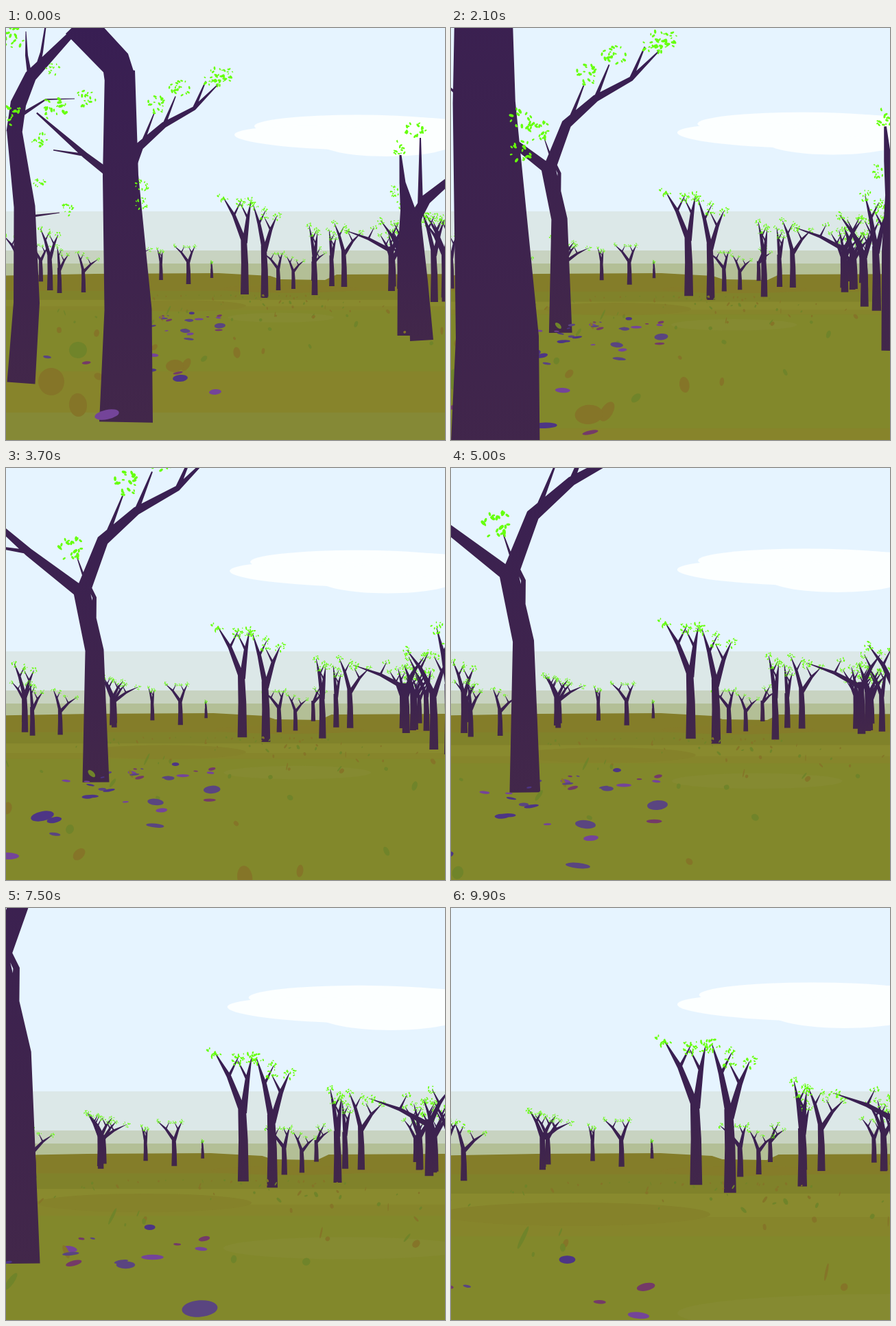
An HTML page with a canvas for the animation above (10000 ms loop, 640 by 600 pixels).

```html
<!DOCTYPE html>
<html>
<head>
<meta charset="utf-8">
<title>Forest walk</title>
<style>
html, body { margin: 0; width: 100%; height: 100%; overflow: hidden; background: #e6f4ff; }
canvas { display: block; }
</style>
</head>
<body>
<canvas id="c" width="640" height="600"></canvas>
<script>
const g = document.getElementById('c').getContext('2d');
const CX = 320, HORIZON = 357, GROUND = 366, SPEED = 735;

// Side sway of the view: [seconds, pixels]
const SWAY = [[0, 0], [2.1, -3.5], [3.7, -7.5], [5, -4], [6.6, -18], [8.3, -6], [9.9, -4.5]];
function sway(t) {
  const i = Math.max(1, SWAY.findIndex(k => k[0] >= t - 1e-6));
  const [t0, a] = SWAY[i - 1], [t1, b] = SWAY[i], k = (t - t0) / (t1 - t0);
  return a + (b - a) * k * k * (3 - 2 * k);
}

function rng(seed) {
  return () => {
    seed = (seed + 0x6D2B79F5) | 0;
    let v = Math.imul(seed ^ seed >>> 15, 1 | seed);
    v = v + Math.imul(v ^ v >>> 7, 61 | v) ^ v;
    return ((v ^ v >>> 14) >>> 0) / 4294967296;
  };
}
const rand = rng(12);
const between = (a, b) => a + (b - a) * rand();

function oval(x, y, rx, ry, color, turn = 0) {
  g.fillStyle = color;
  g.beginPath();
  g.ellipse(x, y, rx, ry, turn, 0, 7);
  g.fill();
}

// ---- trees ----
const trees = [];

// Tapered branch through x, y, width triples
function limb(path, b) {
  const left = [], right = [], n = b.length / 3;
  for (let i = 0; i < n; i++) {
    const p = Math.max(0, i - 1) * 3, q = Math.min(n - 1, i + 1) * 3, k = i * 3;
    const dx = b[q] - b[p], dy = b[q + 1] - b[p + 1], m = b[k + 2] / 2 / Math.hypot(dx, dy);
    left.push([b[k] + dy * m, b[k + 1] - dx * m]);
    right.unshift([b[k] - dy * m, b[k + 1] + dx * m]);
  }
  [...left, ...right].forEach(([x, y], i) => i ? path.lineTo(x, y) : path.moveTo(x, y));
  path.closePath();
}

// x, y: foot at the start; branches and leaf clusters are relative to the foot.
// The foot's height on screen tells how long it takes to reach the tree.
function tree(x, y, size, branches, clusters) {
  const shape = new Path2D(), leaves = [];
  branches.forEach(b => limb(shape, b));
  for (const [cx, cy, r] of clusters) {
    for (let i = 0; i < 8 + r * .7; i++) {
      const a = between(0, 6.3), d = Math.sqrt(rand()) * r, s = r * between(.06, .15) + .25;
      leaves.push([cx + Math.cos(a) * d * 1.15, cy + Math.sin(a) * d, s * 1.35, s * .75, between(0, 3)]);
    }
  }
  const bark = g.createLinearGradient(0, 0, 0, Math.min(...branches.map(b => b[b.length - 2])));
  bark.addColorStop(0, '#42274a');
  bark.addColorStop(1, '#381e53');
  trees.push({ x, y, size, shape, leaves, bark, time: 1080 / (y - 352) });
}

// Forked tree of height h whose two arms reach sideways by l and r times h
function forked(x, y, h, l, r) {
  const w = 3 + h * .06, p = (u, v, k) => [u * h, -v * h, w * k];
  const branches = [[...p(0, 0, 1), ...p(0, .3, .85), ...p(-.01, .56, .7)]], clusters = [];
  for (const [reach, top] of [[l, 1.05 - Math.abs(l) / 2], [r, .92 - Math.abs(r) / 3]]) {
    const elbow = [reach * .5, .5 + (top - .5) * .6], side = reach < 0 ? 1 : -1;
    const twig = [elbow[0] + side * .07, elbow[1] + .14];
    branches.push([...p(0, .5, .65), ...p(...elbow, .42), ...p(reach, top, .06)],
      [...p(...elbow, .28), ...p(...twig, .06)]);
    clusters.push([reach * h, -top * h, h * .05], [twig[0] * h, -twig[1] * h, h * .04]);
  }
  tree(x, y, 1, branches, clusters);
}

function grove(count, x0, x1, y0, y1) {
  for (let i = 0; i < count; i++) {
    const y = between(y0, y1);
    forked(between(x0, x1), y, (y - 345) * 2.5, between(-.3, -.05), between(.05, .3));
  }
}

[[348, 388, 150, -.21, .06], [377, 393, 136, -.12, .13], [450, 389, 100, -.08, .04],
  [493, 377, 95, -.15, .26], [397, 382, 62, -.35, .1], [419, 380, 50, -.2, .3],
  [475, 376, 80, -.05, .08], [448, 368, 50, .2, .35], [266, 373, 63, -.33, .15],
  [226, 367, 46, -.12, .05], [300, 364, 24, -.05, 0], [113, 385, 60, -.15, .35],
  [178, 376, 70, -.2, .45], [562, 383, 116, -.58, .2], [579, 401, 130, -.25, .15],
  [592, 406, 150, -.1, .1], [78, 386, 66, -.05, .2]
].forEach(row => forked(...row));
grove(3, 5, 70, 367, 384);
grove(2, 166, 184, 370, 376);
grove(7, 560, 592, 368, 382);
grove(3, 615, 645, 390, 400);

tree(175, 573, 1, [
  [0, 1, 78, 3, -163, 69, -8, -358, 52, -9, -511, 44],
  [-9, -499, 45, -15, -522, 45, -71, -581, 47]
], [[24, -345, 9], [24, -317, 9]]);

tree(22, 516, 1, [
  [0, 1, 41, 8, -116, 38, 5, -256, 31, -10, -368, 22],
  [-10, -364, 23, -4, -406, 23, 14, -446, 18, 75, -509, 9],
  [13, -444, 7, 8, -476, 4, 7, -511, 1],
  [24, -458, 7, 30, -481, 4, 36, -521, 2],
  [-2, -388, 6, 36, -412, 2, 78, -413, 1],
  [8, -241, 4, 56, -247, 1]
], [[-12, -502, 15], [46, -456, 9], [-14, -391, 16], [48, -399, 17], [95, -414, 13], [28, -353, 11],
  [26, -292, 9], [66, -251, 9]]);

tree(187, 430, .733, [
  [0, 1, 39, -2, -191, 27, -21, -278, 24],
  [-20, -273, 21, 10, -351, 17, 59, -394, 12, 119, -427, 8, 165, -473, 2],
  [17, -360, 7, 39, -416, 2],
  [59, -394, 7, 82, -451, 2],
  [119, -427, 7, 142, -481, 2],
  [-21, -275, 18, -98, -334, 12, -194, -418, 3],
  [-98, -334, 6, -161, -344, 2],
  [-13, -291, 5, -2, -268, 6, -4, -221, 9],
  [-15, -291, 4, -28, -328, 1]
], [[45, -434, 17], [-35, -338, 18], [89, -466, 18], [157, -488, 19], [180, -491, 17]]);

tree(596, 452, 1, [
  [-13, -4, 25, -12, -122, 26, -10, -187, 22, -18, -227, 9, -21, -267, 3],
  [10, 3, 34, 5, -82, 28, -2, -172, 22],
  [-4, -167, 18, 16, -202, 15, 52, -232, 10],
  [8, -192, 8, 8, -292, 2]
], [[-24, -277, 11], [2, -305, 14], [-30, -215, 8]]);

const treeScale = (o, t) => o.time - t > .7 ? o.time / (o.time - t) : 0;

function drawTree(o, t) {
  const s = treeScale(o, t);
  g.save();
  g.translate(CX + sway(t) + (o.x - CX) * s, HORIZON + (o.y - HORIZON) * s);
  g.scale(s * o.size, s * o.size);
  g.fillStyle = o.bark;
  g.fill(o.shape);
  for (const [x, y, a, b, turn] of o.leaves) oval(x, y, a, b, '#66ff0c', turn);
  g.restore();
}

// ---- ground ----
// depth: pixels below the ground's vanishing line at time t
const depth = (time, t) => time - t > .8 ? SPEED / (time - t) : 0;

// Spot given by its look at one moment
function seen(at, x, y, rx, ry, color, turn = -.08) {
  const d = y - GROUND;
  return { time: at + SPEED / d, x: (x - sway(at) - CX) / d, rx: rx / d, ry: ry / d, color, turn };
}

const [BLUE, INDIGO, VIOLET, PLUM] = ['#5a4580', '#4d3585', '#744499', '#743a68'];
const [GREEN, BROWN] = ['#70842a', '#857528'];
const spots = [
  [0, 254, 510, 11, 5, INDIGO], [0, 305, 530, 9, 4, VIOLET], [0, 147, 563, 18, 7, VIOLET, -.2],
  [3.7, 53, 507, 17, 7, INDIGO, -.2], [5, 301, 491, 15, 7, BLUE], [5, 196, 519, 15, 6, BLUE, .1],
  [5, 185, 579, 18, 4, BLUE, .1], [5, 204, 539, 11, 4, VIOLET], [5, 228, 467, 9, 3.5, BLUE, 0],
  [5, 252, 462, 11, 2.5, VIOLET, 0], [5, 242, 440, 6, 3, INDIGO, 0], [5, 302, 449, 6, 2.5, PLUM, -.2],
  [0, 66, 515, 19, 20, BROWN], [0, 105, 469, 13, 12, GREEN], [0, 105, 549, 13, 17, BROWN],
  [0, 246, 492, 13, 9, BROWN], [9.9, 105, 480, 3, 18, GREEN, .45]
].map(s => seen(...s));

for (let i = 0; i < 28; i++) {
  const rx = between(.03, .09);
  spots.push({
    time: between(5, 14), x: between(-2.6, .2), rx, ry: rx * between(.2, .4),
    color: [BLUE, INDIGO, VIOLET, PLUM][i % 4], turn: between(-.25, .2)
  });
}
for (let i = 0; i < 110; i++)
  spots.push({
    time: between(5, 32), x: between(-6, 6), rx: between(.01, .05), ry: between(.02, .09),
    color: i % 2 ? GREEN : BROWN, turn: between(-.8, .8)
  });

const patches = [
  [9.9, 180, 446, 198, 17, '#85822a', 0], [9.9, 640, 590, 310, 28, '#858a31', 0],
  [9.9, 430, 383, 125, 7, '#857c29', 0]
].map(p => seen(...p));

// Soil changes colour along lines across the path, far to near
const SOIL = [[9.9, 388, '#80822a'], [9.9, 416, '#898a2e'], [9.9, 450, '#86852b'],
  [9.9, 478, '#82882b'], [0, 500, '#87842b'], [0, 560, '#858936']];

function drawSpot(o, t) {
  const d = depth(o.time, t);
  if (d) oval(CX + sway(t) + o.x * d, GROUND + d, o.rx * d, o.ry * d, o.color, o.turn);
}

function band(y, color) {
  g.fillStyle = color;
  g.fillRect(0, y, 640, 600 - y);
}

function drawSky(t) {
  const k = 1 + t * .0101, white = '#fcffff';
  band(0, '#e6f4ff');
  g.save();
  g.translate(CX + sway(t), 307);
  g.scale(k, k);
  g.translate(-CX, -307);
  oval(512, 143, 150, 16.5, white);
  oval(482, 160, 149, 17, white, .03);
  oval(555, 167, 98, 20, white);
  oval(620, 148, 90, 17, white, .06);
  g.restore();
  band(267, '#dce8e8');
  band(324, '#c8d3c1');
  band(343, '#b3bf96');
}

function drawGround(t) {
  g.fillStyle = '#847d29';
  g.beginPath();
  g.moveTo(0, 600);
  [[-30, 361], [130, 358], [310, 357], [385, 361], [400, 366], [465, 367], [482, 359], [670, 358]]
    .forEach(([x, y]) => g.lineTo(x + sway(t), y));
  g.lineTo(640, 600);
  g.fill();
  for (const [at, y, color] of SOIL) {
    const d = depth(at + SPEED / (y - GROUND), t);
    if (d) band(GROUND + d, color);
  }
  patches.forEach(p => drawSpot(p, t));
}

function draw(t) {
  drawSky(t);
  drawGround(t);
  const items = [
    ...trees.filter(o => treeScale(o, t))
      .map(o => ({ y: HORIZON + (o.y - HORIZON) * treeScale(o, t), draw: () => drawTree(o, t) })),
    ...spots.map(o => ({ y: GROUND + depth(o.time, t) + 12, draw: () => drawSpot(o, t) }))
  ];
  items.sort((a, b) => a.y - b.y).forEach(i => i.draw());
}

const start = performance.now();
function tick() {
  draw(Math.floor((performance.now() - start) % 10000 / 100) / 10);
  requestAnimationFrame(tick);
}
tick();
</script>
</body>
</html>
```
